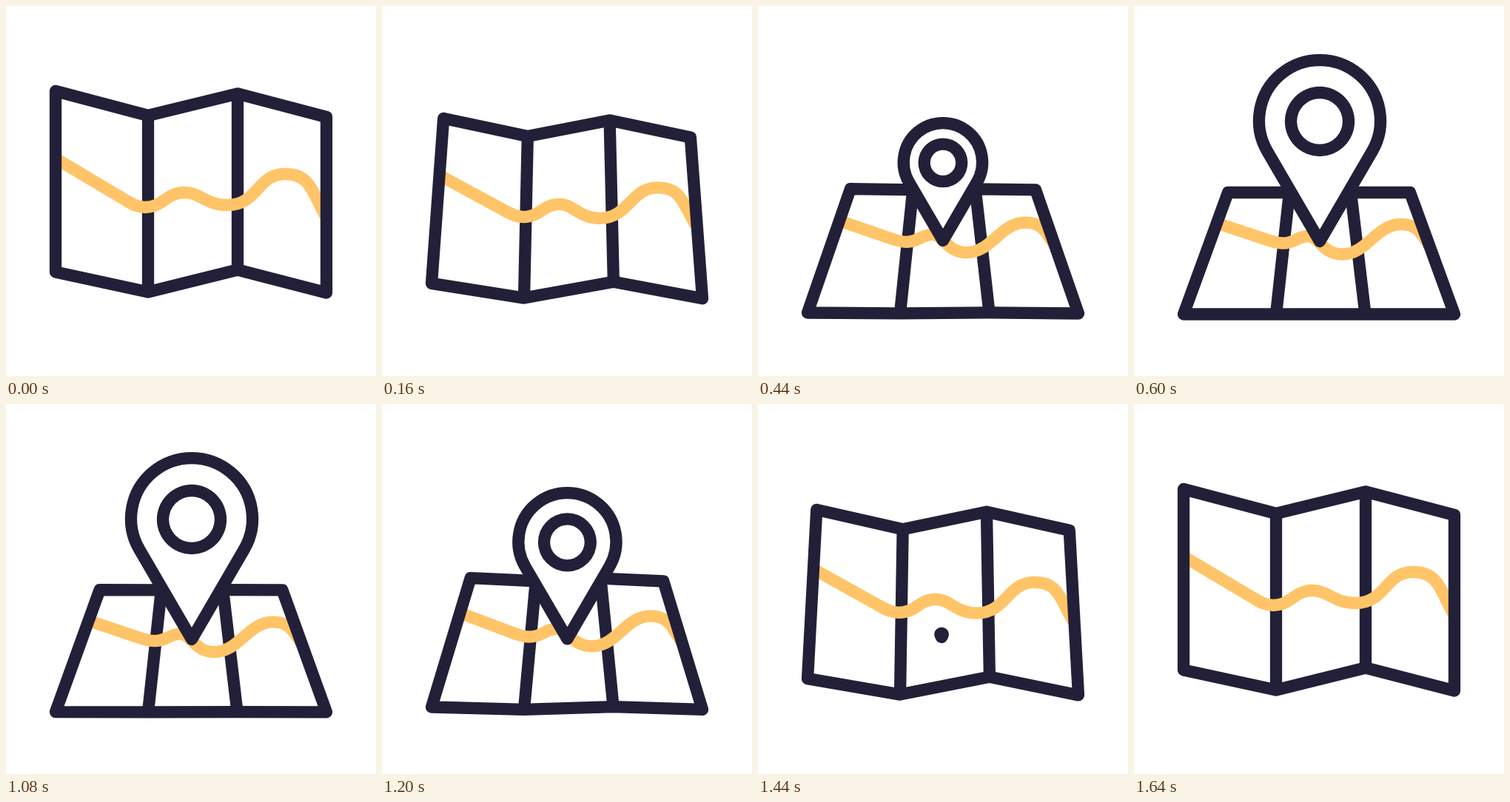
Write an HTML page that moves like this. It is 500x500 px and loops after 2 s.

```html
<!DOCTYPE html>
<html lang="en">
<head>
<meta charset="utf-8">
<title>Map and pin</title>
<style>
  html, body { margin: 0; height: 100%; overflow: hidden; background: #fff; }
  svg { display: block; width: 100%; height: 100%; }
  path { fill: none; stroke: #222039; stroke-width: 16.3; stroke-linejoin: round; }
  #route { stroke: #ffc467; }
  #pin path, #hole { fill: #fff; }
  #pin path { stroke-width: inherit; }
  #ring { fill: #222039; }
</style>
</head>
<body>
<svg viewBox="0 0 500 500">
  <path id="folds"/>
  <path id="route"/>
  <path id="border"/>
  <g id="pin">
    <path d="M0 0L-71 -121.8A82 82 0 1 1 71 -121.8Z"/>
    <circle id="ring" cy="-162"/>
    <circle id="hole" cy="-162"/>
  </g>
</svg>
<script>
const LOOP = 2000, STEP = 40, LINE = 16.3, RING = 39;
const byId = id => document.getElementById(id);
const pin = byId('pin');

// Each path as [upright map, map lying flat]
const shapes = {
  folds: [
    'M192 148L192 386.5M313 118.5L313 356.5',
    'M210 252L192 416.5M293 252L312.5 416.5'
  ],
  border: [
    'M67 115L192 148L313 118.5L433 150L433 387.5L313 356.5L192 386.5L67 359.5Z',
    'M127 252L210 252L293 252L373 252L433 416.5L312.5 416.5L192 416.5L67 416.5Z'
  ],
  route: [
    'M67 206L161 262C172 269 179 272 188 272C212 272 217 252 241 252' +
    'C263 252 270 269 299 269C341 269 339 227 377 227C412 227 413 251 433 286',
    'M111 293L177 315C187 318.5 193 320.5 201 320.5C218 320.5 220 311 236 311' +
    'C250 311 255 335.5 281 335.5C315 335.5 327 295 361 295C384 295 388 308 400 325'
  ]
};

function morph([from, to], p) {
  const ends = to.match(/[\d.]+/g);
  let i = 0;
  return from.replace(/[\d.]+/g, n => (+n + (ends[i++] - n) * p).toFixed(2));
}

// Eases 0 to 1 along cubic-bezier(x1, 0, x2, 1)
function ease(time, start, duration, x1, x2) {
  const x = Math.min(1, Math.max(0, (time - start) / duration));
  let low = 0, high = 1, t = x;
  if (x === 0 || x === 1) return x;
  for (let i = 0; i < 24; i++) {
    t = (low + high) / 2;
    const u = 1 - t;
    if (3 * u * u * t * x1 + 3 * u * t * t * x2 + t ** 3 < x) low = t;
    else high = t;
  }
  return t * t * (3 - 2 * t);
}

function draw(time) {
  const flat = ease(time, 0, 600, .475, .07) - ease(time, 1040, 600, .5, .5);
  const size = ease(time, 200, 400, .462, .58) - ease(time, 1080, 400, .4, .6);
  for (const id in shapes) byId(id).setAttribute('d', morph(shapes[id], flat));

  pin.style.display = size > 0 ? '' : 'none';
  if (size > 0) {
    // Line weight stays constant while the pin scales
    const line = LINE / size;
    pin.setAttribute('transform', `translate(${248 + 3 * size} ${315 + 3 * size}) scale(${size})`);
    pin.style.strokeWidth = line;
    byId('ring').setAttribute('r', RING + line / 2);
    byId('hole').setAttribute('r', Math.max(0, RING - line / 2));
  }
}

function tick() {
  const time = performance.now() % LOOP;
  draw(Math.floor(time / STEP) * STEP);
  requestAnimationFrame(tick);
}
tick();
</script>
</body>
</html>
```
